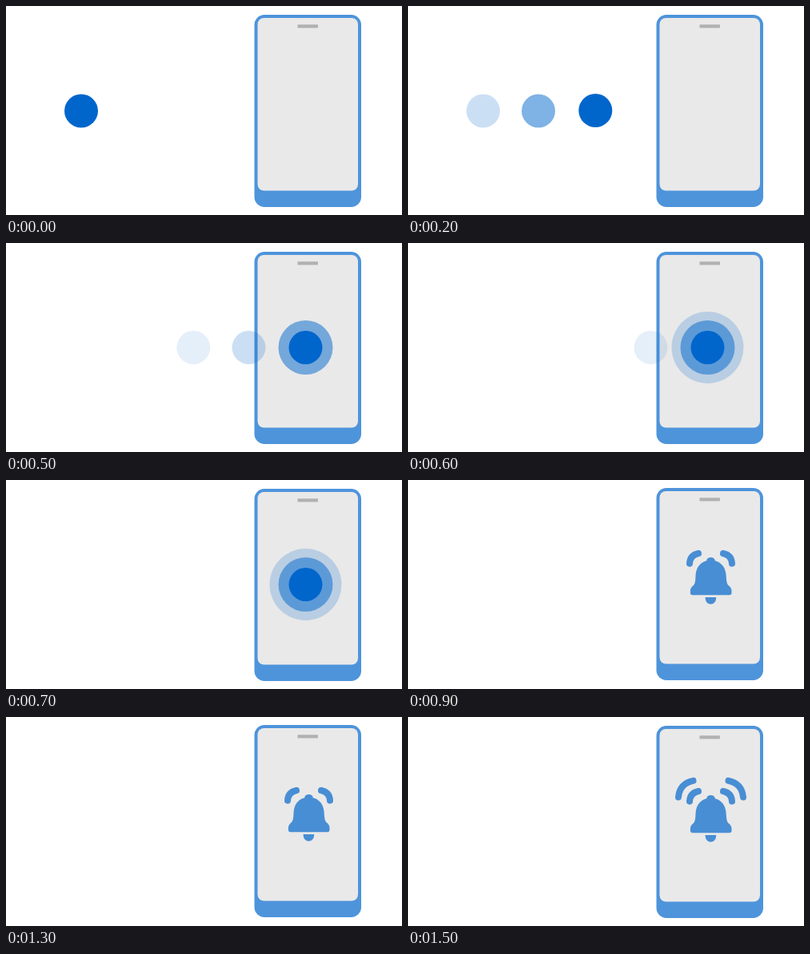
Write an HTML page that moves like this. It is 495 px wide and 262 px high and loops after 1.7 s.

```html
<!DOCTYPE html>
<html lang="en">
<head>
<meta charset="utf-8">
<title>Push notification</title>
<style>
  html, body { margin: 0; width: 100%; height: 100%; overflow: hidden; background: #fff; }
  svg { display: block; width: 495px; height: 262px; }

  .ball, .pulse, .bell, .near, .far, .device { animation: 1.7s step-end infinite; }
  .ball, .pulse { fill: #06c; opacity: 0; }
  .ball { animation-name: trail; animation-delay: calc(var(--i) * 100ms); }
  .pulse { animation-name: var(--show); }
  .device { animation-name: shake; }
  .bell { animation-name: ring; fill: #488ed4; }
  .near { animation-name: near; }
  .far { animation-name: far; }
  .waves { fill: none; stroke: #488ed4; stroke-width: 8; stroke-linecap: round; }

  @keyframes trail {
    0% { opacity: 1; }
    5.88% { opacity: .5; }
    11.76% { opacity: .2; }
    17.64% { opacity: .1; }
    23.52%, 100% { opacity: 0; }
  }
  @keyframes core {
    0% { opacity: 0; }
    23.52% { opacity: 1; }
    47.05%, 100% { opacity: 0; }
  }
  @keyframes mid {
    0% { opacity: 0; }
    29.41% { opacity: .5; }
    47.05%, 100% { opacity: 0; }
  }
  @keyframes outer {
    0% { opacity: 0; }
    35.29% { opacity: .2; }
    47.05%, 100% { opacity: 0; }
  }
  @keyframes ring {
    0% { opacity: 0; }
    47.05%, 100% { opacity: 1; }
  }
  @keyframes near {
    0% { opacity: 0; }
    52.93%, 100% { opacity: 1; }
  }
  @keyframes far {
    0% { opacity: 0; }
    64.7% { opacity: 1; }
    76.46% { opacity: 0; }
    88.23%, 100% { opacity: 1; }
  }
  @keyframes shake {
    0% { transform: none; }
    52.93% { transform: translateY(-1px); }
    64.7% { transform: none; }
    76.46% { transform: translateY(-1px); }
    88.23%, 100% { transform: none; }
  }
</style>
</head>
<body>
<svg viewBox="0 0 495 262">
  <g class="device">
    <rect x="310.5" y="11" width="133.5" height="241" rx="12.5" fill="#4e94db"/>
    <rect x="314.5" y="15" width="125.5" height="216.5" rx="8" fill="#e9e9e9"/>
    <rect x="364.5" y="23.3" width="25.4" height="4.2" fill="#b1b1b1"/>
    <g class="bell">
      <path d="M373.2 102.2C373.6 96.6 383.4 96.6 383.8 102.2C392.5 104.5 397 111.5 397.6 120C398 126 398 131 401 133.6C403.6 135.8 404.5 137.5 404.5 140.5V142.5Q404.5 145.3 401.5 145.3H355.9Q352.9 145.3 352.9 142.5V140.5C352.9 137.5 353.8 135.8 356.4 133.6C359.4 131 359.2 126 359.6 120C360.2 111.5 364.5 104.5 373.2 102.2Z"/>
      <path d="M371.6 148H385.2C385.2 153.5 382.5 156.6 378.4 156.6S371.6 153.5 371.6 148Z"/>
    </g>
    <g class="waves">
      <g class="near">
        <path d="M352 105.7Q352.6 95.2 363 93"/>
        <path d="M405 105.7Q404.4 95.2 394 93"/>
      </g>
      <g class="far">
        <path d="M338 100.5Q339.5 83.5 356.5 79.9"/>
        <path d="M419 100.5Q417.5 83.5 400.5 79.9"/>
      </g>
    </g>
  </g>
  <circle class="ball" style="--i:0" cx="94" cy="131.5" r="21"/>
  <circle class="ball" style="--i:1" cx="163" cy="131.5" r="21"/>
  <circle class="ball" style="--i:2" cx="234.3" cy="131" r="21"/>
  <circle class="ball" style="--i:3" cx="303.5" cy="131" r="21"/>
  <circle class="pulse" style="--show:outer" cx="374.5" cy="131" r="45"/>
  <circle class="pulse" style="--show:mid" cx="374.5" cy="131" r="34"/>
  <circle class="pulse" style="--show:core" cx="374.5" cy="131" r="21"/>
</svg>
</body>
</html>
```
